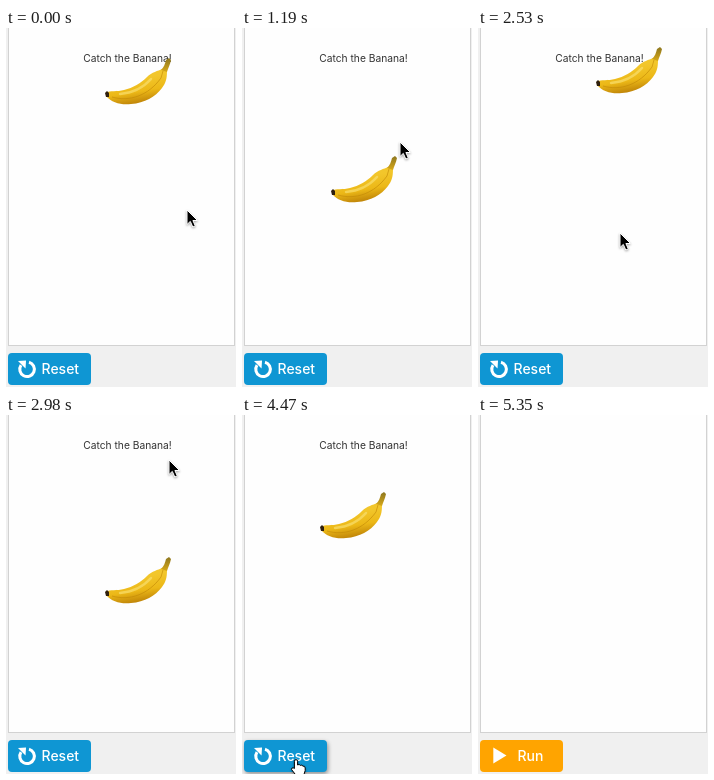
Animation, 230 px wide and 359 px high, one loop 5.95 s. Source, as an HTML page:

```html
<!DOCTYPE html>
<html lang="en">
<head>
<meta charset="utf-8">
<title>Catch the Banana</title>
<style>
html, body { margin: 0; width: 100%; height: 100%; overflow: hidden; background: #f0f0f0; }
svg { display: block; width: 230px; height: 359px; }
text { font-family: Inter, "Open Sans", sans-serif; }
.label { font-size: 14px; font-weight: 500; fill: #fff; }
.hover { filter: drop-shadow(1px 2px 2px rgba(0, 0, 0, .4)); }
</style>
</head>
<body>
<svg viewBox="0 0 230 359">
  <defs>
    <linearGradient id="peel" x1=".4" y1=".3" x2=".6" y2="1">
      <stop offset="0" stop-color="#f2c62b"/>
      <stop offset=".5" stop-color="#ecb817"/>
      <stop offset="1" stop-color="#b97d06"/>
    </linearGradient>
    <linearGradient id="stem" x1="0" y1="0" x2="0" y2="1">
      <stop offset="0" stop-color="#8c7620"/>
      <stop offset="1" stop-color="#d7a818"/>
    </linearGradient>
  </defs>
  <rect width="230" height="359" fill="#f0f0f0"/>
  <rect x="2.5" y="-2.5" width="226" height="320" fill="#fefefe" stroke="#d2d2d2"/>
  <text id="title" x="121.5" y="34" text-anchor="middle" font-size="10.25" fill="#333">Catch the Banana!</text>

  <g id="banana">
    <path fill="url(#peel)" d="M1 35C5 32 12 34 19 32C28 30 36 25 42 19C47 14 53 13 57 11L62 13C62 20 61 25 57 30C50 39 40 45 26 46C16 47 7 45 1 38Z"/>
    <path fill="url(#stem)" d="M56 12C59 9 60 6 61 2L64 0L66 2C65 7 63 10 62 14Z"/>
    <path fill="none" stroke="#f8dc68" stroke-width="2.5" stroke-linecap="round" opacity=".75" d="M15 36C28 35 38 30 46 21"/>
    <path fill="none" stroke="#c48b09" opacity=".65" d="M7 39C24 44 43 38 56 20L58 13"/>
    <path fill="#30200d" d="M0 35L2 33L4 35L4 39L1 39Z"/>
  </g>

  <g id="reset">
    <rect class="face" x="2" y="325" width="83" height="32" rx="4" fill="#0f96d3"/>
    <path fill="none" stroke="#fff" stroke-width="3" d="M23 334.2A7.3 7.3 0 1 1 15 337.2"/>
    <path fill="#fff" d="M12 333L20 332.5L19.5 340.5Z"/>
    <text class="label" x="35.5" y="346">Reset</text>
  </g>
  <g id="run">
    <rect class="face" x="2" y="325" width="83" height="32" rx="4" fill="#ffa400"/>
    <path fill="#fff" d="M15.3 332.5L28.5 340.5L15.3 348.5Z"/>
    <text class="label" x="39.5" y="346">Run</text>
  </g>

  <g id="pointer" style="filter:drop-shadow(0 1px 1px rgba(0,0,0,.35))">
    <path id="arrow" fill="#000" stroke="#fff" d="M0 0V14.5L3.3 11.4L5.8 17L8.3 15.9L5.9 10.5H10.5Z"/>
    <path id="hand" fill="#fff" stroke="#000" stroke-linejoin="round" d="M-1.6 8.5V1.2Q-1.4 -.4 0 -.4T1.6 1.2V5Q3.2 3.7 4.4 5.4Q6 4.5 7 6.2Q9 5.6 9.2 8V10.5L7.8 15H-.2L-4.4 9.6Q-4.6 7.4 -2.8 7.8Z"/>
  </g>
</svg>
<script>
const LOOP = 5950, STEP = 148.6, LAST = 36, CLICK = 32;

// [step, x, y]: the banana jumps from spot to spot
const spots = [
  [0, 99, 30], [2, 133, 130], [5, 66, 12], [7, 89, 128], [9, 60, 213],
  [12, 22, 20], [15, 111, 195], [17, 118, 19], [20, 99, 142], [24, 78, 77]
];
// [step, x, y]: the pointer glides between these
const path = [
  [0, 181, 182], [2, 148, 62], [3, 150, 80], [5, 164, 148], [7, 125, 82],
  [8, 158, 114], [9, 142, 140], [11, 110, 224], [12, 106, 228], [13, 110, 163],
  [15, 60, 48], [17, 142, 205], [20, 163, 45], [23, 153, 175], [24, 139, 247],
  [25, 133, 256], [28, 76, 328], [30, 54, 345], [33, 54, 345], [35, 62, 358], [36, 66, 380]
];

const $ = id => document.getElementById(id);
const show = (id, on) => $(id).style.display = on ? "" : "none";
const place = (id, x, y) => $(id).setAttribute("transform", `translate(${x} ${y})`);

function pointerAt(n) {
  const i = Math.max(1, path.findIndex(p => p[0] >= n));
  const [a, x0, y0] = path[i - 1], [b, x1, y1] = path[i];
  const k = (n - a) / (b - a);
  return [x0 + (x1 - x0) * k, y0 + (y1 - y0) * k];
}

function draw(now) {
  const n = Math.min(LAST, Math.floor(now % LOOP / STEP));
  const [x, y] = pointerAt(n);
  const [, bx, by] = spots.findLast(s => s[0] <= n);
  const over = x < 85 && y > 325 && y < 357;
  const running = n < CLICK;

  place("banana", bx, by);
  place("pointer", x, y);
  show("title", running);
  show("banana", running);
  show("reset", running);
  show("run", !running);
  show("pointer", n < LAST);
  show("arrow", !over);
  show("hand", over);
  for (const face of document.querySelectorAll(".face")) face.classList.toggle("hover", over);
}

const start = performance.now();
function tick() {
  draw(performance.now() - start);
  requestAnimationFrame(tick);
}
tick();
</script>
</body>
</html>
```
